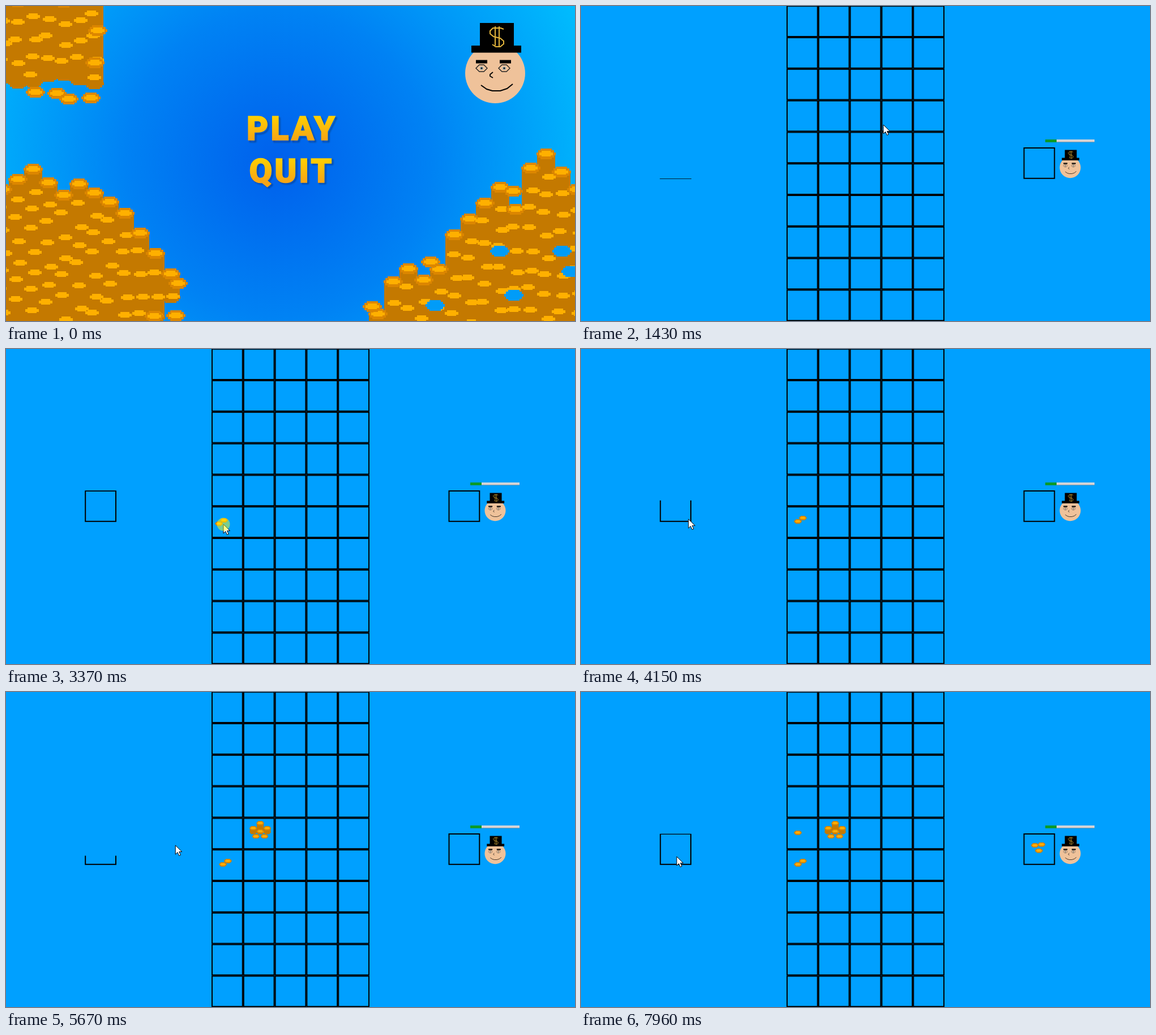
Animation of 1005x557 px, one loop 8000 ms. Source, as an HTML page with a canvas:

```html
<!DOCTYPE html>
<html lang="en">
<head>
<meta charset="utf-8">
<title>Coin game</title>
<style>
html, body { margin: 0; width: 100%; height: 100%; overflow: hidden; background: #00a0ff; }
canvas { display: block; }
</style>
</head>
<body>
<canvas id="stage" width="1005" height="557"></canvas>
<script>
const ctx = document.getElementById('stage').getContext('2d');
const LOOP = 8000, GAME_START = 1430, CELL = 55.8, COLUMN = 27;

// Pointer moves: start, end, target x, y
const entry = [983, 545];
const moves = [
  [200, 910, 534, 210], [1990, 2480, 160, 328], [2680, 3370, 384, 310], [3510, 4290, 172, 300],
  [4450, 4840, 403, 274], [4840, 5250, 440, 254], [5250, 6020, 193, 284], [6580, 6780, 381, 243],
  [6910, 7330, 190, 328], [7330, 7520, 112, 322], [7520, 7960, 169, 291]
];

// Outlines of the heaps
const leftRidge = [[-6, 325], [48, 289], [100, 336], [129, 315], [205, 360], [304, 491]];
const rightRidge = [
  [657, 545], [684, 488], [711, 465], [752, 495], [792, 405], [873, 321],
  [900, 360], [927, 287], [954, 262], [1008, 325]
];

const heaps = [
  slope(-6, 300, x => along(leftRidge, x), x => Math.min(600, 900 - 1.32 * x)),
  slope(657, 1008, x => along(rightRidge, x), () => 600),
  slope(-6, 156, x => -12 + 6 * Math.sin(x), x => 130 + 8 * Math.sin(x / 20))
];
const looseCoins = [
  [304, 491], [262, 549], [300, 548], [647, 532], [750, 453], [896, 328], [162, 44], [157, 101],
  [52, 153], [90, 155], [111, 165], [150, 163]
];
const holes = [[872, 434], [982, 434], [998, 470], [897, 512], [758, 530]];

const trio = cluster(3, 18, -.65);
const pile = [...cluster(5, 34, -Math.PI / 2, 8), [0, 4, 8]];

// Drop cell centre, offset from the pointer, and times of pick-up and release
const items = [
  { coins: cluster(2, 14, -.6), x: 391, y: 306, dx: -3.5, dy: -4, pick: 2740, drop: 3440 },
  { coins: pile, x: 447, y: 250, dx: 2, dy: -5, pick: 4500, drop: 5250 },
  { coins: cluster(1, 0, 0), x: 391, y: 250, dx: -8, dy: -1, pick: 6580, drop: 6910 }
];
const refills = [1410, 3410, 5350, 6890], REFILL_TIME = 1080;

function along(points, x) {
  const i = Math.max(1, points.findIndex(p => p[0] >= x));
  const [x0, y0] = points[i - 1], [x1, y1] = points[i];
  return y0 + (y1 - y0) * (x - x0) / (x1 - x0);
}

// Columns of coins as x, top, bottom
function slope(from, to, topAt, bottomAt) {
  const columns = [];
  for (let x = from; x <= to; x += COLUMN) columns.push([x, Math.round(topAt(x)), Math.round(bottomAt(x))]);
  return columns;
}

function cluster(count, radius, turn, base = -Infinity) {
  return Array.from({ length: count }, (_, i) => {
    const angle = turn + i * 2 * Math.PI / count;
    const y = radius * Math.sin(angle);
    return [radius * Math.cos(angle), y, Math.max(y, base)];
  });
}

function rect(color, x, y, w, h) {
  ctx.fillStyle = color;
  ctx.fillRect(x, y, w, h);
}

function disc(color, x, y, r) {
  ctx.fillStyle = color;
  ctx.beginPath();
  ctx.arc(x, y, r, 0, 7);
  ctx.fill();
}

function stroke(color, width, d) {
  ctx.strokeStyle = color;
  ctx.lineWidth = width;
  ctx.stroke(new Path2D(d));
}

function slab(color, x, y) {
  rect(color, x - 10, y - 10, 20, 19);
  rect(color, x - 14, y - 7, 28, 13);
  rect(color, x - 17, y - 3, 34, 5);
}

function coinFace(x, y) {
  rect('#ffb000', x - 8, y - 6, 16, 10);
  rect('#ffb000', x - 12, y - 3, 24, 5);
}

function coin(x, y) {
  slab('#dc8600', x, y);
  coinFace(x, y);
}

function heap(columns) {
  const body = '#c47900';
  for (const [x, top, bottom] of columns) {
    slab(body, x, top);
    slab(body, x, bottom);
    rect(body, x - 16, top, 32, bottom - top);
  }
  for (const [x, top, bottom] of columns) {
    coin(x, top);
    for (let y = top + 36; y < bottom; y += 36) {
      const shift = Math.round(5 * Math.sin(x * 7 + y));
      coinFace(x + shift, y + shift);
    }
  }
}

function heapAt(columns, x, y) {
  ctx.save();
  ctx.translate(x, y);
  ctx.scale(.38, .38);
  heap(columns);
  ctx.restore();
}

function face() {
  disc('#efc29a', 864, 119, 53);
  rect('#000', 837, 30, 60, 42);
  rect('#000', 822, 70, 88, 12.5);
  stroke('#e3b53c', 2, 'M879 41L874 39H860L855 44V49L861 54L873 57L879 62V67L873 72H865L859 68M864 36V70M871 36V73');
  rect('#000', 830, 95.5, 20, 6);
  rect('#000', 872, 95.5, 20, 6);
  for (const x of [840, 880]) {
    stroke('#222', 1.4, `M${x - 10} 110l6 -6h8l6 6l-6 6h-8z`);
    disc('#9ab0b8', x, 110, 3);
    disc('#111', x, 110, 1.6);
  }
  stroke('#000', 1.8, 'M860 117L855 121V124L860 127');
  stroke('#000', 2, 'M839 140L849 147L859 150H873L885 146L895 138');
}

function label(text, x, baseline) {
  ctx.save();
  ctx.font = '900 59px Roboto, sans-serif';
  ctx.letterSpacing = '4px';
  ctx.textAlign = 'center';
  const gold = ctx.createLinearGradient(0, baseline - 42, 0, baseline);
  gold.addColorStop(0, '#ffd000');
  gold.addColorStop(1, '#f7a416');
  ctx.fillStyle = ctx.strokeStyle = gold;
  ctx.lineWidth = 1.6;
  ctx.shadowColor = 'rgba(0,0,0,.5)';
  ctx.shadowBlur = 3;
  ctx.shadowOffsetX = ctx.shadowOffsetY = 2.5;
  ctx.strokeText(text, x, baseline);
  ctx.shadowColor = 'transparent';
  ctx.fillText(text, x, baseline);
  ctx.restore();
}

function menu(t) {
  const sky = ctx.createRadialGradient(480, 278, 0, 480, 278, 600);
  sky.addColorStop(0, '#0060ec');
  sky.addColorStop(.45, '#0082f4');
  sky.addColorStop(1, '#00befe');
  rect(sky, 0, 0, 1005, 557);
  heaps.forEach(heap);
  holes.forEach(([x, y]) => slab('#009cf8', x, y));
  looseCoins.forEach(([x, y]) => coin(x, y));
  face();
  if (t >= 1170) {
    ctx.fillStyle = 'rgba(0,0,0,.38)';
    ctx.beginPath();
    ctx.roundRect(407, 190, 191.5, 54, 4);
    ctx.fill();
  }
  label('PLAY', 505, 237);
  label('QUIT', 504.5, 311.5);
}

function box(x, y) {
  ctx.strokeStyle = '#000';
  ctx.lineWidth = 2;
  ctx.strokeRect(x + 1, y + 1, CELL - 2, CELL - 2);
}

function game(t, x, y) {
  rect('#00a0ff', 0, 0, 1005, 557);
  for (let col = 0; col < 5; col++)
    for (let row = 0; row < 10; row++) box(363 + col * CELL, row * CELL - .8);

  // The left box refills from the bottom up
  const start = refills.filter(r => r <= t).pop();
  const fill = Math.min(1, (t - start) / REFILL_TIME) * CELL;
  ctx.save();
  ctx.beginPath();
  ctx.rect(130, 306 - fill, 80, fill);
  ctx.clip();
  box(139.2, 250);
  ctx.restore();
  box(781.5, 250);

  rect('#d4d4d8', 820, 236, 87, 5);
  rect('#8e9aa4', 820, 240, 87, 1);
  rect('#0a9a2a', 820, 236, 20, 5);
  ctx.save();
  ctx.translate(561.6, 244);
  ctx.scale(.35, .35);
  face();
  ctx.restore();

  if (t >= 6650) heapAt(trio, 808, 274);
  for (const item of items) {
    if (t < item.pick) continue;
    const held = t < item.drop;
    heapAt(item.coins, (held ? x : item.x) + item.dx, (held ? y : item.y) + item.dy);
  }
}

function cursor(x, y) {
  const arrow = new Path2D(`M${x} ${y}v16l3.8 -3.6l2.6 6l2.8 -1.2l-2.6 -5.8h5z`);
  ctx.fillStyle = '#fff';
  ctx.fill(arrow);
  ctx.strokeStyle = '#000';
  ctx.lineWidth = 1;
  ctx.stroke(arrow);
}

function pointer(t) {
  let [x, y] = entry;
  for (const [start, end, toX, toY] of moves) {
    const k = Math.min(1, Math.max(0, (t - start) / (end - start)));
    const eased = k * k * (3 - 2 * k);
    x += (toX - x) * eased;
    y += (toY - y) * eased;
  }
  return [x, y];
}

function draw(now) {
  const t = now % LOOP;
  const [x, y] = pointer(t);
  if (t < GAME_START) menu(t);
  else game(t, x, y);
  if (t >= 200) cursor(x, y);
  if (items.some(i => t >= i.pick && t < i.drop)) disc('rgba(255,255,20,.48)', x, y, 11.5);
}

const begin = performance.now();
function tick() {
  draw(performance.now() - begin);
  requestAnimationFrame(tick);
}
tick();
</script>
</body>
</html>
```
